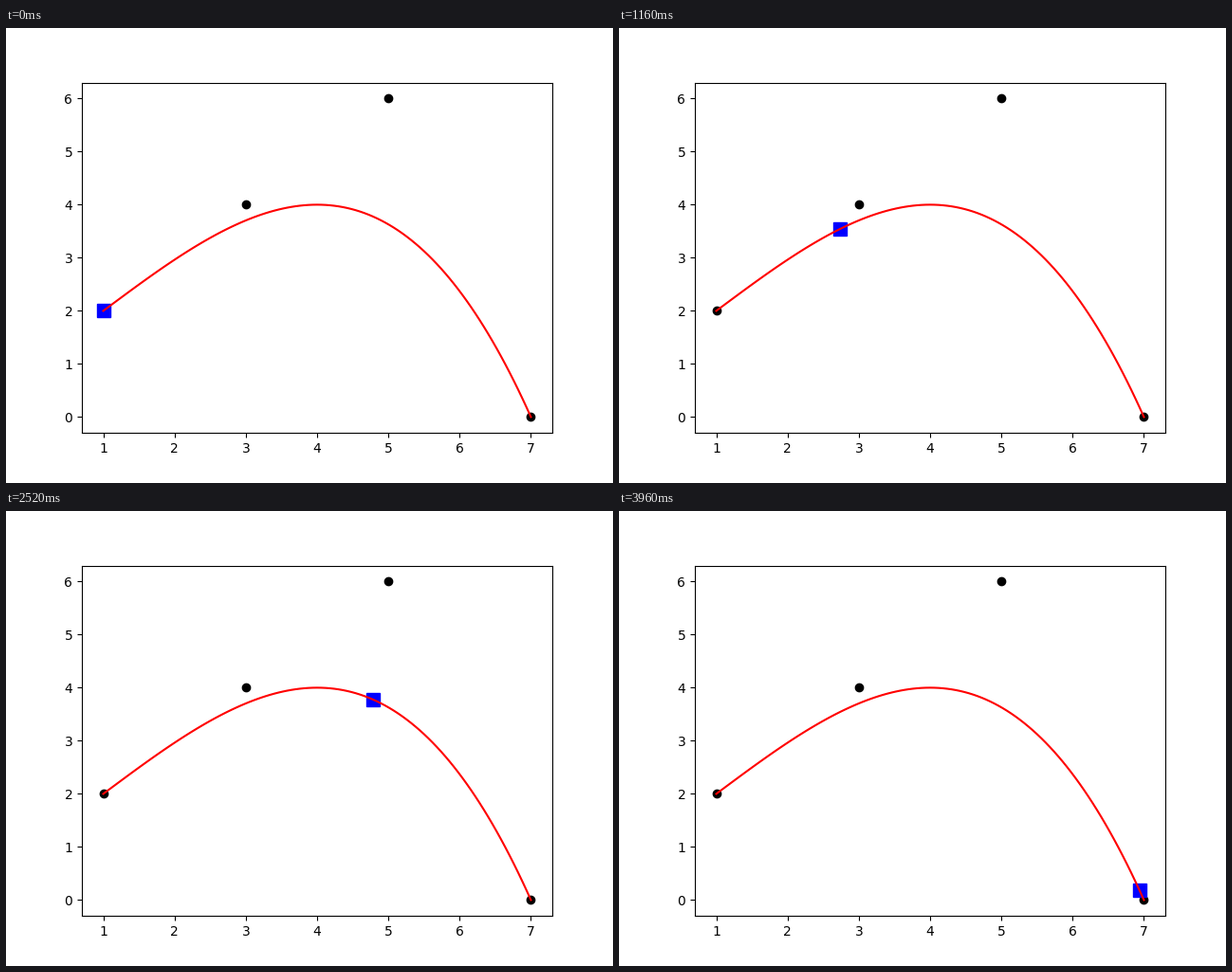
These frames come from a looping animation (640x480 px, 4000 ms). A matplotlib script:

```python
import numpy as np
import matplotlib.pyplot as plt
from matplotlib.animation import FuncAnimation

FRAMES = 100
CONTROL = np.array([(1, 2), (3, 4), (5, 6), (7, 0)], dtype=float)


def bezier(t):
    """Points of the cubic Bezier curve at parameters t, as x and y arrays."""
    t = np.atleast_1d(t)
    s = 1 - t
    weights = np.array([s**3, 3 * s**2 * t, 3 * s * t**2, t**3])
    return CONTROL.T @ weights


fig, ax = plt.subplots(figsize=(6.4, 4.8), dpi=100)
ax.plot(*CONTROL.T, "ko")
square, = ax.plot(*bezier(0), "bs", markersize=10)
ax.plot(*bezier(np.linspace(0, 1, 101)), "r-")


def update(i):
    square.set_data(*bezier(i / FRAMES))
    return square,


anim = FuncAnimation(fig, update, frames=FRAMES, interval=40,
                     repeat=True, repeat_delay=0)
plt.show()
```
